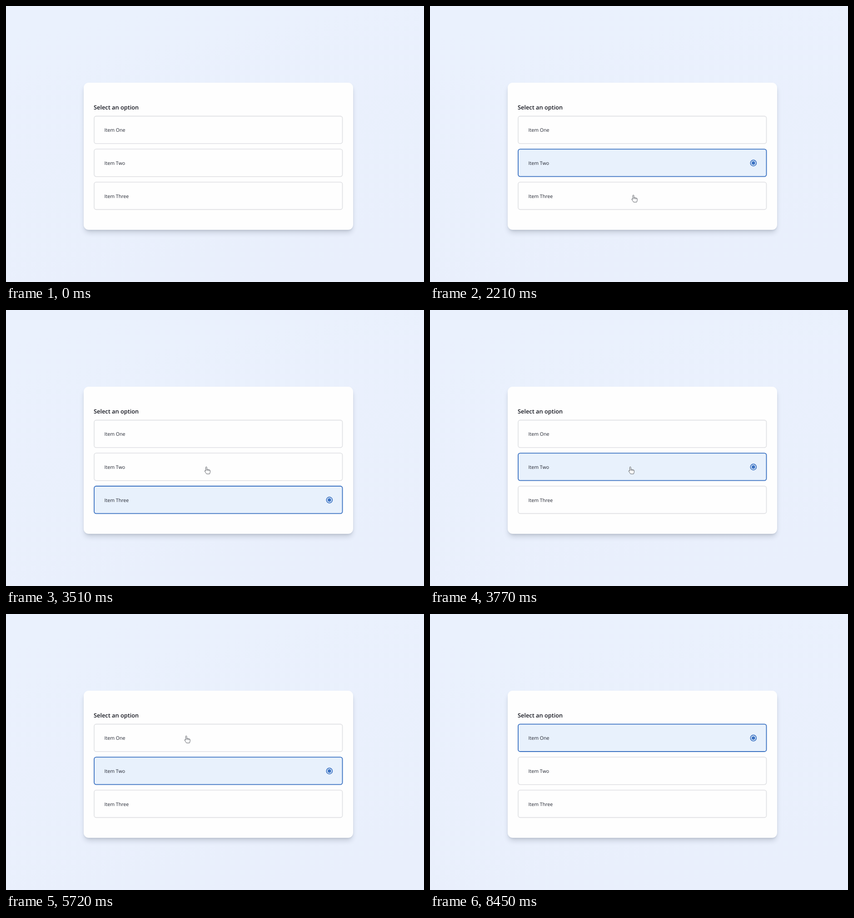
Animation, 920 px wide and 608 px high, one loop 9230 ms. Source, as an HTML page:

```html
<!DOCTYPE html>
<html lang="en">
<head>
<meta charset="utf-8">
<title>Option picker</title>
<style>
  html, body { margin: 0; width: 100%; height: 100%; overflow: hidden; }
  body { position: relative; background: linear-gradient(170deg, #eaf1fd, #e9effc); }
  .card {
    position: absolute; left: 171px; top: 168.5px; width: 592.5px; height: 324.5px;
    border-radius: 11px; background: #fefefe;
    box-shadow: 0 8px 12px -2px rgba(20, 30, 50, .17), 0 3px 5px -2px rgba(20, 30, 50, .12);
  }
  svg { position: absolute; left: 0; top: 0; display: block; }
  text { font-family: "Open Sans", "Noto Sans", sans-serif; font-size: 10.6px; fill: #20242f; text-rendering: geometricPrecision; }
  .title { font-size: 12.8px; font-weight: 600; fill: #14161f; }
  .box { fill: #fefefe; stroke: #dfe0e3; stroke-width: 1.6; }
  .radio { visibility: hidden; }
  .ring { fill: #e3effd; stroke: #3b72c2; stroke-width: 1.7; }
  .dot { fill: #3b72c2; }
  .on .box { fill: #e8f1fc; stroke: #3b72c2; stroke-width: 1.8; }
  .on .radio { visibility: visible; }
  #pointer path { fill: #fff; stroke: #4a4d55; stroke-width: .9; stroke-linejoin: round; stroke-linecap: round; }
</style>
</head>
<body>
<div class="card"></div>
<svg width="920" height="608" viewBox="0 0 920 608">
  <text class="title" x="193" y="227.6">Select an option</text>
  <g id="list"></g>
  <g id="pointer">
    <g id="hand">
      <path d="M-1.5 9V1.2C-1.5-.5 1.1-.5 1.1 1.2V6C1.6 4.9 3.6 5.1 3.6 6.3C4.3 5.5 6 5.8 6.1 7C7 6.4 8.4 6.9 8.4 8.2V11C8.4 13 7.4 14 7 15.6H.4C-.6 13.4-2.6 11.6-3.7 9.8C-4.4 8.5-2.8 7.6-1.5 9Z"/>
      <path d="M1.1 6V8.4M3.6 6.3V8.6M6.1 7V8.9"/>
    </g>
    <path id="arrow" d="M0 0V12.2L2.8 9.6L4.7 13.8L6.6 13L4.8 8.9H8.6Z"/>
  </g>
</svg>
<script>
const LOOP = 9230, STEP = 130, TRAVEL = 5 * STEP;
const ROW = { top: 242.6, gap: 72.7, height: 60.4, left: 194, width: 546.5 };
const $ = id => document.getElementById(id);

$('list').innerHTML = ['One', 'Two', 'Three'].map((name, i) => {
  const y = ROW.top + i * ROW.gap, mid = y + ROW.height / 2;
  return `<g>
    <rect class="box" x="${ROW.left}" y="${y}" width="${ROW.width}" height="${ROW.height}" rx="4.6"/>
    <text x="216.6" y="${mid + 4.6}">Item ${name}</text>
    <g class="radio" transform="translate(711.8 ${mid + .4})">
      <circle class="ring" r="6.5"/>
      <circle class="dot" r="3.8"/>
    </g>
  </g>`;
}).join('');
const rows = [...$('list').children];

// The pointer rests below the stage between visits.
const away = { x: 416, y: 630 }, first = { x: 396.8, y: 268.5 };
const moves = [
  { at: 0, to: first },
  { at: 780, to: { x: 415, y: 364 } },
  { at: 1820, to: { x: 454, y: 426.5 } },
  { at: 2860, to: { x: 441, y: 345.5 } },
  { at: 4030, to: away },
  { at: 5070, to: first },
  { at: 7930, to: away }
];
const clicks = [650, 1690, 2600, 3770, 6760];

const easeOut = u => 1 - (1 - u) ** 2;
const mix = (a, b, u) => a + (b - a) * u;

function pointerAt(t) {
  const i = moves.findLastIndex(m => m.at <= t);
  const from = i ? moves[i - 1].to : away, { at, to } = moves[i];
  const u = easeOut(Math.min(1, (t - at) / TRAVEL));
  return { x: mix(from.x, to.x, u), y: mix(from.y, to.y, u) };
}

function rowAt(y) {
  const i = Math.floor((y - ROW.top) / ROW.gap);
  const inside = y - ROW.top - i * ROW.gap <= ROW.height;
  return inside && i < rows.length ? i : -1;
}

function pickedAt(t) {
  const click = clicks.findLast(c => c <= t);
  return click === undefined ? -1 : rowAt(pointerAt(click).y);
}

function draw(time) {
  const t = Math.floor((time % LOOP) / STEP) * STEP;
  const picked = pickedAt(t);
  rows.forEach((row, i) => row.classList.toggle('on', i === picked));

  const { x, y } = pointerAt(t), hover = rowAt(y) >= 0;
  $('pointer').setAttribute('transform', `translate(${x} ${y})`);
  $('hand').style.display = hover ? '' : 'none';
  $('arrow').style.display = hover ? 'none' : '';
}

const start = performance.now();
function tick() {
  draw(performance.now() - start);
  requestAnimationFrame(tick);
}
tick();
</script>
</body>
</html>
```
